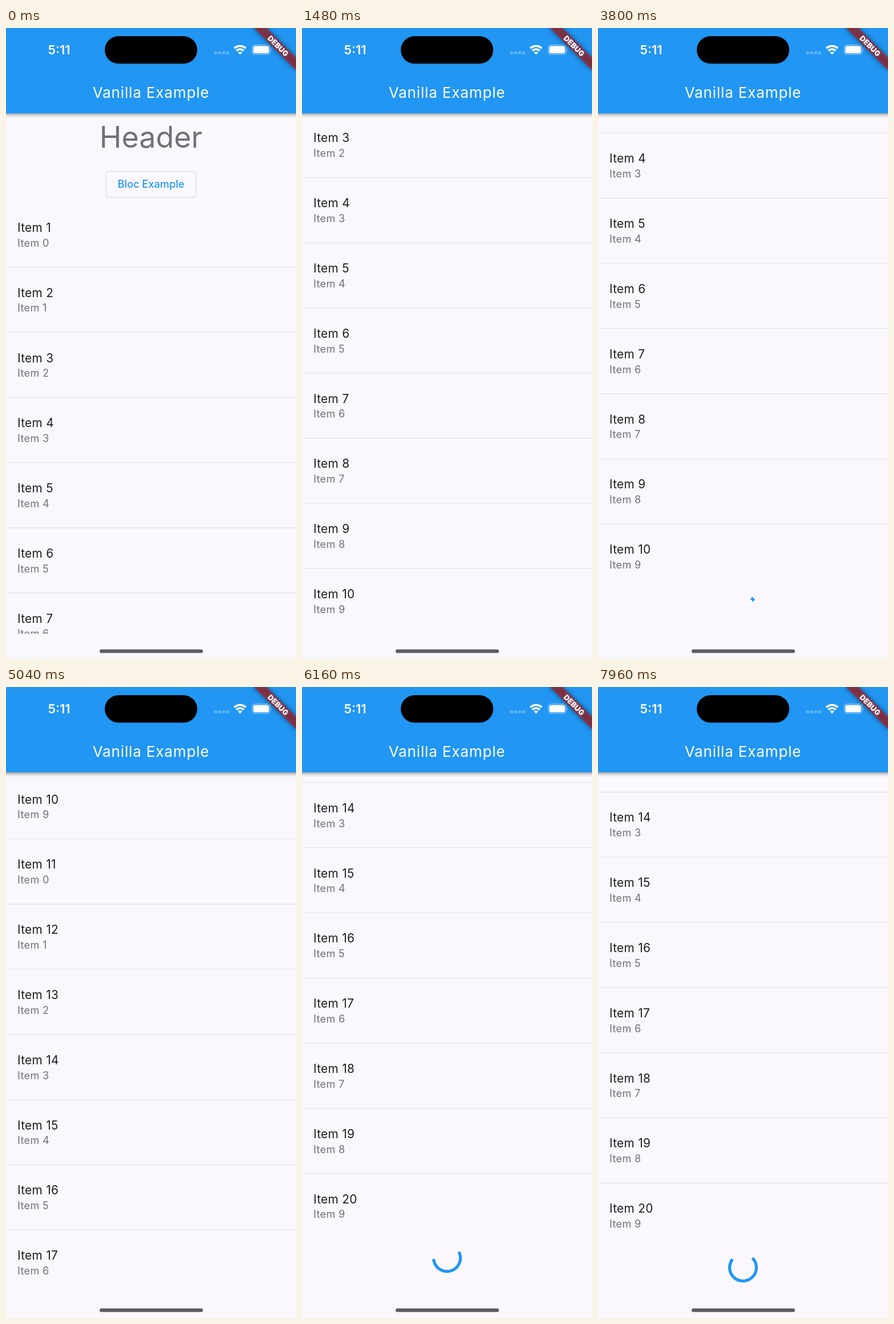
These frames come from a looping animation (508 by 1102 pixels, 8 s). An HTML page:

```html
<!DOCTYPE html>
<html lang="en">
<head>
<meta charset="utf-8">
<title>Infinite list</title>
<style>
  html, body { margin: 0; width: 100%; height: 100%; overflow: hidden; background: #faf8fc; }
  svg { display: block; width: 508px; height: 1102px; font-family: Inter, sans-serif; }
  .mid { text-anchor: middle; }
  .title { font-size: 20.8px; letter-spacing: .3px; fill: #1e1d1f; }
  .sub { font-size: 18.2px; letter-spacing: .3px; fill: #737175; }
  .bar { fill: #2196f3; filter: drop-shadow(0 2px 3px rgba(0, 0, 0, .45)); }
  .blur { filter: blur(5px); }
</style>
</head>
<body>
<svg viewBox="0 0 508 1102">
  <clipPath id="view"><rect y="140" width="508" height="918"/></clipPath>
  <g clip-path="url(#view)">
    <g id="list">
      <text class="mid" x="254" y="209" font-size="52" fill="#737175">Header</text>
      <rect x="175" y="250.3" width="158" height="45.6" rx="5" fill="none" stroke="#dddbe0" stroke-width="1.3"/>
      <text class="mid" x="254" y="279.4" font-size="18.2" font-weight="500" fill="#2196f3">Bloc Example</text>
      <circle id="spinner" r="23.44" pathLength="360" fill="none" stroke="#2196f3" stroke-width="5.2" stroke-linecap="square"/>
    </g>
  </g>

  <rect class="bar" x="-20" y="-20" width="548" height="169"/>
  <text class="mid" x="254" y="122" font-size="26" letter-spacing=".85" fill="#fff">Vanilla Example</text>

  <!-- status bar -->
  <text class="mid" x="93" y="46.2" font-size="22" font-weight="600" fill="#fff">5:11</text>
  <rect x="173" y="14.3" width="162" height="48" rx="24"/>
  <path d="M364.5 43.4h26" stroke="#fff" stroke-opacity=".32" stroke-width="4.8" stroke-dasharray="5 2"/>
  <g fill="none" stroke="#fff" stroke-width="3.5">
    <path d="M399.8 35.5A15 15 0 0 1 420.2 35.5M403.6 39.6A9.4 9.4 0 0 1 416.4 39.6"/>
    <path d="M410 46.5L406.3 42.6A5.4 5.4 0 0 1 413.7 42.6Z" fill="#fff" stroke="none"/>
  </g>
  <rect x="431.2" y="29.6" width="31.6" height="16.6" rx="5" fill="none" stroke="#fff" stroke-opacity=".45" stroke-width="1.3"/>
  <rect x="433.2" y="31.6" width="27.6" height="12.6" rx="3.3" fill="#fff"/>
  <path d="M464.4 35.2q2 2.7 0 5.4z" fill="#fff" fill-opacity=".5"/>

  <!-- corner ribbon -->
  <g transform="translate(508 0) rotate(45)">
    <rect class="blur" x="-52.1" y="36.5" width="104.2" height="15.6" fill-opacity=".5"/>
    <rect x="-52.1" y="36.5" width="104.2" height="15.6" fill="#b71c1c" fill-opacity=".627"/>
    <text class="mid" y="49" font-size="13" font-weight="900" fill="#fff">DEBUG</text>
  </g>

  <rect x="164" y="1085.2" width="181" height="6.4" rx="3.2" fill="#5f5d61"/>
</svg>
<script>
const LOOP = 8000, PITCH = 113.8, FIRST = 348.5;
const LOAD_1 = 1238, LOADED = 4320, LOAD_2 = 5860;
const list = document.getElementById('list');
const spinner = document.getElementById('spinner');
const rowY = n => FIRST + (n - 1) * PITCH;

function add(parent, tag, attrs, text = '') {
  const el = document.createElementNS('http://www.w3.org/2000/svg', tag);
  for (const key in attrs) el.setAttribute(key, attrs[key]);
  el.textContent = text;
  return parent.appendChild(el);
}

const pages = [add(list, 'g'), add(list, 'g')];
for (let n = 1; n <= 20; n++) {
  const page = pages[n > 10 ? 1 : 0], y = rowY(n);
  if (n > 1) add(page, 'rect', { y: y - 45.2, width: 508, height: 1.2, fill: '#e6e4e8' });
  add(page, 'text', { class: 'title', x: 20, y: y + 7.4 }, `Item ${n}`);
  add(page, 'text', { class: 'sub', x: 20, y: y + 33.1 }, `Item ${(n - 1) % 10}`);
}

// Each flick: start time, peak time, peak offset, resting offset
const flicks = [
  [105, 720, 449, 384],
  [1880, 2180, 523.7, 461.8],
  [4860, 5260, 1577, 1522],
  [5860, 6100, 1621, 1599.8]
];

function scrollAt(t) {
  let pos = 0, from = 0;
  for (const [start, top, peak, rest] of flicks) {
    if (t < start) break;
    if (t < top) {
      pos = from + (peak - from) * (1 - (1 - (t - start) / (top - start)) ** 1.7);
    } else {
      const k = (t - top) * 0.0141; // critically damped spring
      pos = rest + (peak - rest) * (1 + k) * Math.exp(-k);
    }
    from = rest;
  }
  return pos;
}

// cubic-bezier(.4, 0, .2, 1)
function ease(x) {
  if (x <= 0 || x >= 1) return x <= 0 ? 0 : 1;
  let lo = 0, hi = 1, s;
  for (let i = 0; i < 20; i++) {
    s = (lo + hi) / 2;
    const bx = 1.2 * s * (1 - s) ** 2 + 0.6 * s * s * (1 - s) + s ** 3;
    if (bx < x) lo = s; else hi = s;
  }
  return s * s * (3 - 2 * s);
}

function spin(age, row) {
  const u = age / 1333 % 1;
  const head = ease(u * 2) * 270, tail = ease(u * 2 - 1) * 270;
  const angle = tail + age / 2222 * 360 + u * 90 - 90;
  spinner.setAttribute('stroke-dasharray', `${Math.max(head - tail, 0.06)} 360`);
  spinner.setAttribute('transform', `translate(254 ${rowY(row) + 103}) rotate(${angle})`);
}

function draw(t) {
  list.setAttribute('transform', `translate(0 ${-scrollAt(t)})`);
  pages[1].style.display = t < LOADED ? 'none' : '';
  const first = t >= LOAD_1 && t < LOADED, second = t >= LOAD_2;
  spinner.style.display = first || second ? '' : 'none';
  if (first) spin(t - LOAD_1, 10);
  if (second) spin(t - LOAD_2, 20);
}

const begin = performance.now();
function tick() {
  draw((performance.now() - begin) % LOOP);
  requestAnimationFrame(tick);
}
tick();
</script>
</body>
</html>
```
